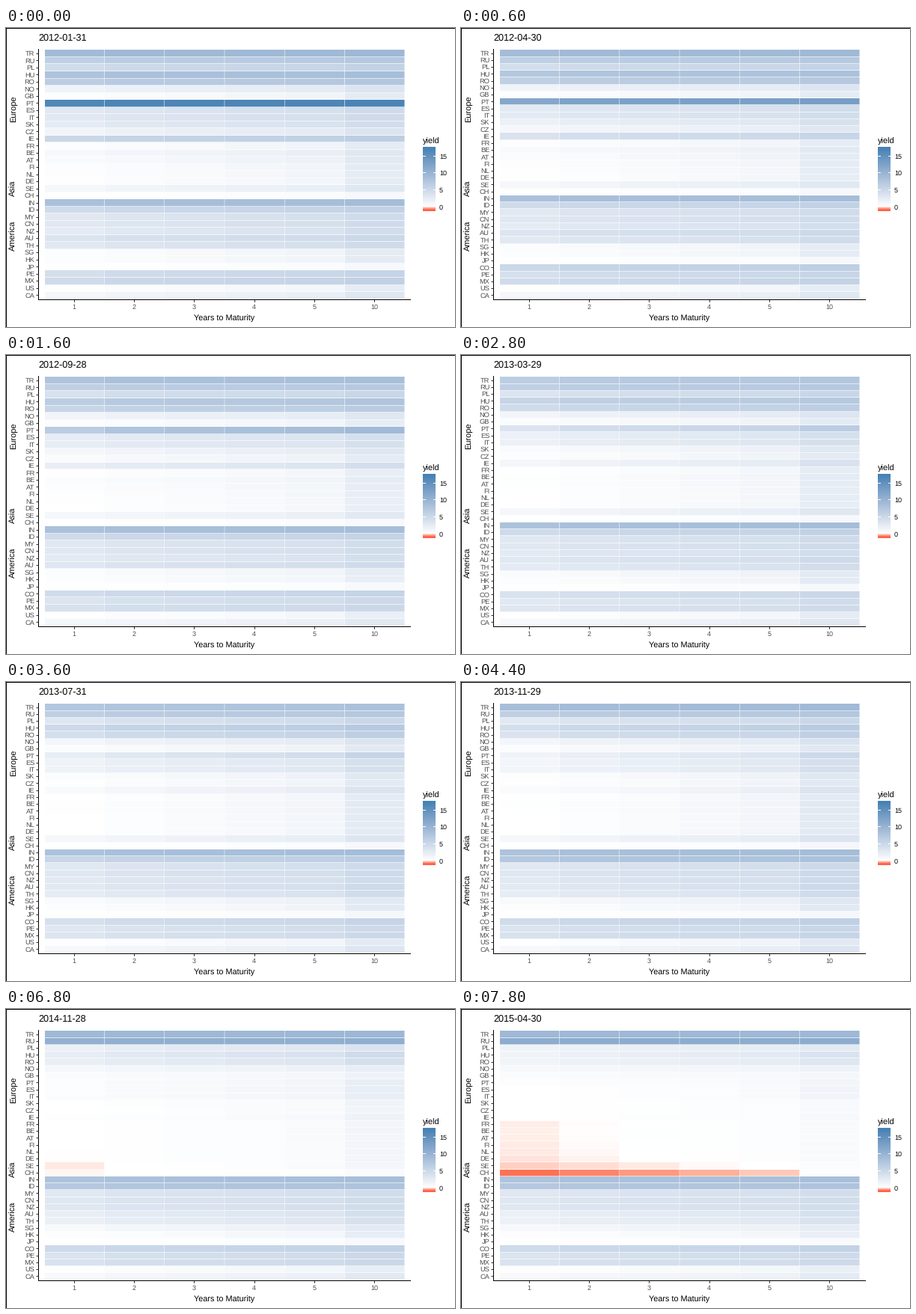
A matplotlib script for the animation above (8000 ms loop, 600x400 px).

```python
import numpy as np
import matplotlib.pyplot as plt
from matplotlib.animation import FuncAnimation
from matplotlib.collections import LineCollection, PolyCollection

plt.rcParams["font.family"] = "Liberation Sans"
plt.rcParams["text.hinting"] = "none"

W, H, DPI = 600, 400, 100
FRAMES, STEP = 40, 200
LEFT, RIGHT, TOP, BOTTOM = 43.2, 540.8, 28.0, 363.0
LOW, HIGH = -0.8, 17.3

CODES = ("TR RU PL HU RO NO GB PT ES IT SK CZ IE FR BE AT FI NL DE SE CH "
         "IN ID MY CN NZ AU TH SG HK JP CO PE MX US CA").split()
EUROPE = CODES[:21]
FLAT = ("CH", "JP")
TERMS = ("1", "2", "3", "4", "5", "10")
SLOPE = np.array([0, 0.1, 0.2, 0.32, 0.45, 1])


def ease(t, begin, end):
    u = np.clip((t - begin) / (end - begin), 0, 1)
    return u * u * (3 - 2 * u)


# One-year yield paths over the months, from a to b.
def slide(t, a, b):
    return a + (b - a) * t / (FRAMES - 1)


def dip(t, a, b):
    return slide(t, a, b) * (1 - 0.28 * np.exp(-((t - 14) / 7) ** 2))


def fade(t, a, b):
    return a * np.exp(-t / 9) + b * ease(t, 33, 39)


def climb(t, a, b):
    return a + (b - a) * ease(t, 16, 22)


def turn(t, a, b):
    return a + (b - a) * ease(t, 22, 37)


# Path, pace of the ten-year yield along it, first and last level.
GROUPS = (
    (slide, 0.75, dict(PL=(4.6, 1.6), HU=(8, 1.5), RO=(6.6, 1.4),
                       NO=(1.5, 0.9), GB=(0.3, 0.5), ES=(3, 0), IT=(3, 0),
                       IN=(8.3, 8), MY=(3, 3.1), CN=(3, 3.2), NZ=(2.6, 3.2),
                       AU=(3.6, 2), TH=(3, 1.8), SG=(0.3, 0.9),
                       HK=(0.3, 0.2), JP=(0.1, 0), US=(0.1, 0.2),
                       CA=(1, 0.8))),
    (dip, 1, dict(TR=(9.2, 9.5), CO=(5.4, 4.8), PE=(4.3, 3.6),
                  MX=(4.8, 3.7))),
    (fade, 0.75, dict(PT=(16.6, 0), IE=(5.3, -0.03), SK=(2.6, 0),
                      CZ=(1.4, 0), FR=(0.3, -0.1), BE=(0.9, -0.1),
                      AT=(0.6, -0.1), FI=(0.3, -0.11), NL=(0.2, -0.12),
                      DE=(0.1, -0.15), CH=(0.1, -0.74))),
    (climb, 1, dict(ID=(4.7, 7.3))),
    (turn, 1, dict(RU=(6.3, 11.2), SE=(1, -0.25))),
)
PATHS = {code: (path, pace, ends)
         for path, pace, members in GROUPS for code, ends in members.items()}


def curve(code, t):
    """Yields for all terms; low rates give a steep long end."""
    path, pace, ends = PATHS[code]
    short = path(t, *ends)
    spread = max(2.4 - 0.22 * short, 0.3)
    last = 0.28 if code in EUROPE else 0.8
    spread *= np.interp(t, (0, 8, 22, 39), (1, 0.85, 1.15, last))
    if code in FLAT:
        spread *= 0.35
    long = path(t * pace, *ends) + spread
    bow = 1 / (1 + max(short, 0) / 4)
    return short + (long - short) * SLOPE ** bow


def lab_to_rgb(lab):
    fy = (lab[..., 0] + 16) / 116
    f = np.stack([fy + lab[..., 1] / 500, fy, fy - lab[..., 2] / 200], -1)
    xyz = np.where(f > 6 / 29, f ** 3, (f - 4 / 29) * 108 / 841)
    xyz = xyz * [0.95047, 1, 1.08883]
    m = np.array([[3.2406, -1.5372, -0.4986],
                  [-0.9689, 1.8758, 0.0415],
                  [0.0557, -0.2040, 1.0570]])
    lin = np.clip(xyz @ m.T, 0, 1)
    return np.clip(np.where(lin > 0.0031308,
                            1.055 * lin ** (1 / 2.4) - 0.055,
                            12.92 * lin), 0, 1)


def shade(values):
    """Tomato - white - steel blue, blended in Lab."""
    stops = ((62.2, 100, 52.47), (57.9, 0, -4.07), (46.4, 0, -32.2))
    lab = [np.interp(values, (LOW, 0, HIGH), s) for s in stops]
    return lab_to_rgb(np.stack(lab, -1))


def listed(month):
    gone = {0: "CO", 8: "TH"}.get(month)
    return [code for code in CODES if code != gone]


def month_end(month):
    following = np.datetime64("2012-02") + month
    last = following.astype("datetime64[D]") - 1
    return str(np.busday_offset(last, 0, roll="backward"))


fig = plt.figure(figsize=(W / DPI, H / DPI), dpi=DPI, facecolor="white")
ax = fig.add_axes([0, 0, 1, 1])


def text(x, y, s, px, color="black", **kw):
    return ax.text(x, y, s, fontsize=px * 72 / DPI, color=color, **kw)


def box(x, y, w, h, color):
    ax.add_patch(plt.Rectangle((x, y), w, h, fc=color, lw=0,
                               antialiased=False))


# Legend bar
bins = np.linspace(LOW, HIGH, 20)
centres = 245 - (np.arange(20) + 0.5) * 4.3
rows = np.arange(159, 245) + 0.5
ramp = shade(bins)
bar = np.stack([np.interp(rows, centres[::-1], ramp[::-1, k])
                for k in range(3)], -1)
ax.imshow(bar[:, None, :], extent=(557, 574, 245, 159), aspect="auto",
          interpolation="nearest")
for value in (0, 5, 10, 15):
    y = np.interp(value, bins, centres)
    for x in (557, 570.5):
        box(x, np.floor(y - 0.5), 3.5, 1, "white")
    text(579, y + 3.2, str(value), 9)
text(557, 155, "yield", 11)

ax.set(xlim=(0, W), ylim=(H, 0))
ax.axis("off")

# Outer edge and axis lines
box(0, 0, W, 1, "black")
box(0, 0, 1, H, "black")
box(43, 28, 1, 336, "black")
box(43, 363, 498, 1, "black")

col = (RIGHT - LEFT) / 6.2
for i, term in enumerate(TERMS):
    x = LEFT + (i + 0.6) * col
    box(round(x - 0.5), 364, 1, 3, "#333333")
    text(x - 0.6, 376, term, 9, "#4d4d4d", ha="center")
text(291.5, 391.5, "Years to Maturity", 10.9, ha="center")
for name, y in (("Europe", 108.5), ("Asia", 214.5), ("America", 278)):
    text(15.5, y, name, 11, rotation=90, ha="right", va="center")

title = text(43, 17, "", 12.6)
labels = [text(38.3, 0, "", 9.3, "#4d4d4d", ha="right") for _ in CODES]
tiles = PolyCollection([], linewidths=0, antialiaseds=True, snap=False)
ticks = LineCollection([], colors="#333333", linewidths=0.75)
ax.add_collection(tiles, autolim=False)
ax.add_collection(ticks, autolim=False)

x_edges = LEFT + (np.arange(7) + 0.1) * col
x_starts = x_edges[:-1] + 0.25
x_starts[0] = np.ceil(x_edges[0])
x_ends = x_edges[1:] - 0.25


def draw(month):
    codes = listed(month)
    pitch = (BOTTOM - TOP) / (len(codes) + 0.2)
    title.set_text(month_end(month))
    for label in labels:
        label.set_text("")
    quads, marks, values = [], [], []
    for r, code in enumerate(codes):
        mid = TOP + (r + 0.6) * pitch
        labels[r].set_text(code)
        labels[r].set_y(mid + 3.2)
        marks.append([(40.3, mid), (43, mid)])
        # Whole-pixel tops leave a pale seam above each row.
        y0 = np.floor(mid - pitch / 2) + 1
        y1 = np.floor(mid + pitch / 2) + 0.35
        for x0, x1 in zip(x_starts, x_ends):
            quads.append([(x0, y0), (x1, y0), (x1, y1), (x0, y1)])
        values.extend(curve(code, month))
    tiles.set_verts(quads)
    tiles.set_facecolor(shade(np.array(values)))
    ticks.set_segments(marks)
    return [tiles, ticks, title, *labels]


anim = FuncAnimation(fig, draw, frames=FRAMES, interval=STEP,
                     repeat=True, repeat_delay=0, blit=False)
plt.show()
```
